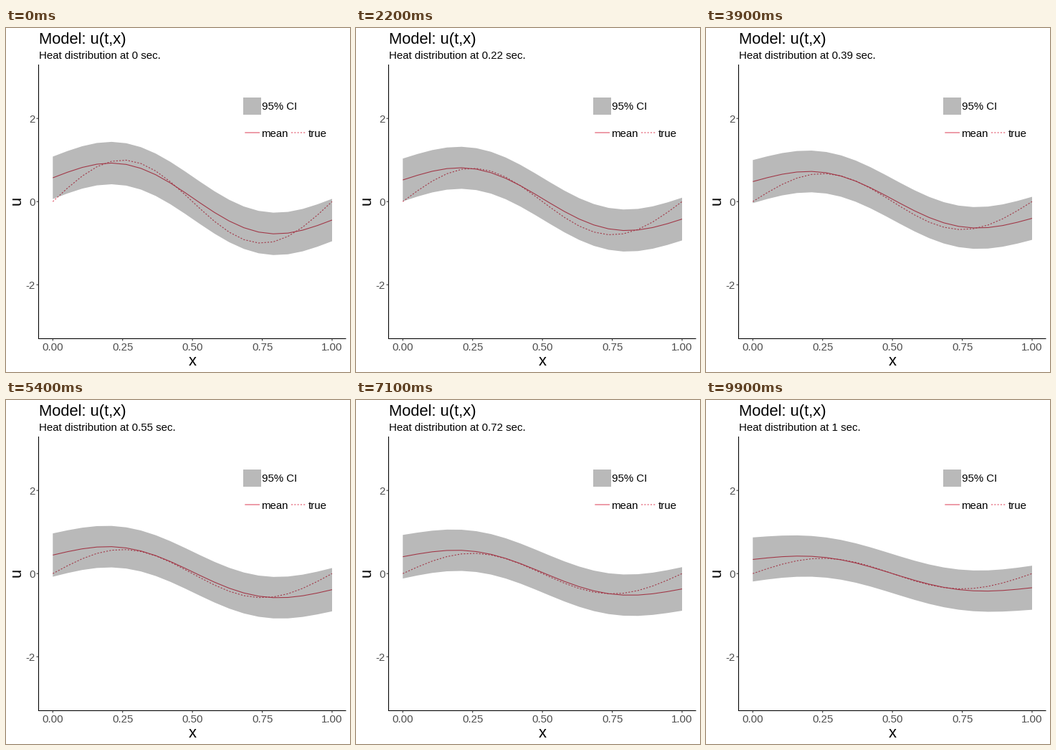
A matplotlib script for the animation above (10000 ms loop, 480x480 px).

```python
import numpy as np
import matplotlib.pyplot as plt
from matplotlib.animation import FuncAnimation
from matplotlib.patches import Rectangle

SIZE, FRAMES, INTERVAL = 480, 100, 100
RED, BAND, TICK, LABEL = "#df4a60", 0.275, "#333333", "#4d4d4d"
LINE = dict(color=RED, lw=1.07, solid_capstyle="butt", snap=False, zorder=2)
DASH = dict(LINE, ls=(0, (2, 2)), dash_capstyle="butt")

plt.rcParams["font.family"] = "Liberation Sans"
plt.rcParams["axes.unicode_minus"] = False

x = np.linspace(0, 1, 20)


def px(v):
    return 65.3 + 389.7 * v


def py(v):
    return 242.2 - 58 * v


def true_heat(t):
    return np.exp(-t) * np.sin(2 * np.pi * x)


def mean_heat(t):
    """Fitted wave: a flattening slope plus a fading sine."""
    slope = (0.508 - 0.168 * t) * (1 - 2 * x)
    wave = (0.575 - 0.35 * t) * np.sin(2 * np.pi * x)
    lift = (1 - t) * (0.064 + 0.03 * np.sin(np.pi * x) ** 2)
    return slope + wave + lift


def half_width(t):
    """Half of the interval, widening towards both ends over time."""
    return 0.51 - 0.04 * t + 0.06 * t * (2 * x - 1) ** 2


fig = plt.figure(figsize=(SIZE / 72, SIZE / 72), dpi=72, facecolor="white")
ax = fig.add_axes([0, 0, 1, 1])
ax.set(xlim=(0, SIZE), ylim=(SIZE, 0))
ax.axis("off")


def text(x0, y0, s, size=15, color="black", ha="left", **kw):
    return ax.text(x0, y0, s, size=size, color=color, ha=ha, va="baseline", **kw)


def rule(xs, ys, color="black"):
    ax.plot(xs, ys, color=color, lw=1.07, solid_capstyle="butt",
            snap=False, zorder=4)


# Axes
rule([45.5, 45.5], [51, 434])
rule([45, 474.5], [433.5, 433.5])
for v in (-2, 0, 2):
    rule([42.5, 45.5], [py(v)] * 2, TICK)
    text(40.7, py(v) + 5.6, str(v), color=LABEL, ha="right")
for v in np.linspace(0, 1, 5):
    rule([px(v)] * 2, [433.5, 436.5], TICK)
    text(px(v), 450, f"{v:.2f}", color=LABEL, ha="center")
text(260, 471, "x", 22, ha="center")
text(20.5, 241, "u", 22, ha="center", rotation=90, rotation_mode="anchor")

# Titles and legend
text(45.5, 22.3, "Model: u(t,x)", 22)
subtitle = text(45.5, 43, "")
ax.add_patch(Rectangle((331, 97), 25, 24, fc="black", alpha=BAND, lw=0))
text(356.6, 114, "95% CI")
ax.plot([333.3, 354], [146, 146], **LINE)
text(356.4, 152, "mean")
ax.plot([398, 419], [146, 146], **DASH)
text(421.3, 152, "true")

mean_line, = ax.plot([], [], **LINE)
true_line, = ax.plot([], [], **DASH)
ribbon, = ax.fill(px(x), py(x), fc="black", alpha=BAND, lw=0, zorder=3)


def update(i):
    t = i / (FRAMES - 1)
    mean, half = mean_heat(t), half_width(t)
    subtitle.set_text(f"Heat distribution at {round(t, 2):g} sec.")
    mean_line.set_data(px(x), py(mean))
    true_line.set_data(px(x), py(true_heat(t)))
    top = np.column_stack([px(x), py(mean + half)])
    bottom = np.column_stack([px(x), py(mean - half)])
    ribbon.set_xy(np.vstack([top, bottom[::-1]]))
    return subtitle, mean_line, true_line, ribbon


anim = FuncAnimation(fig, update, frames=FRAMES, interval=INTERVAL,
                     init_func=lambda: update(0), repeat=True, repeat_delay=0)
plt.show()
```
